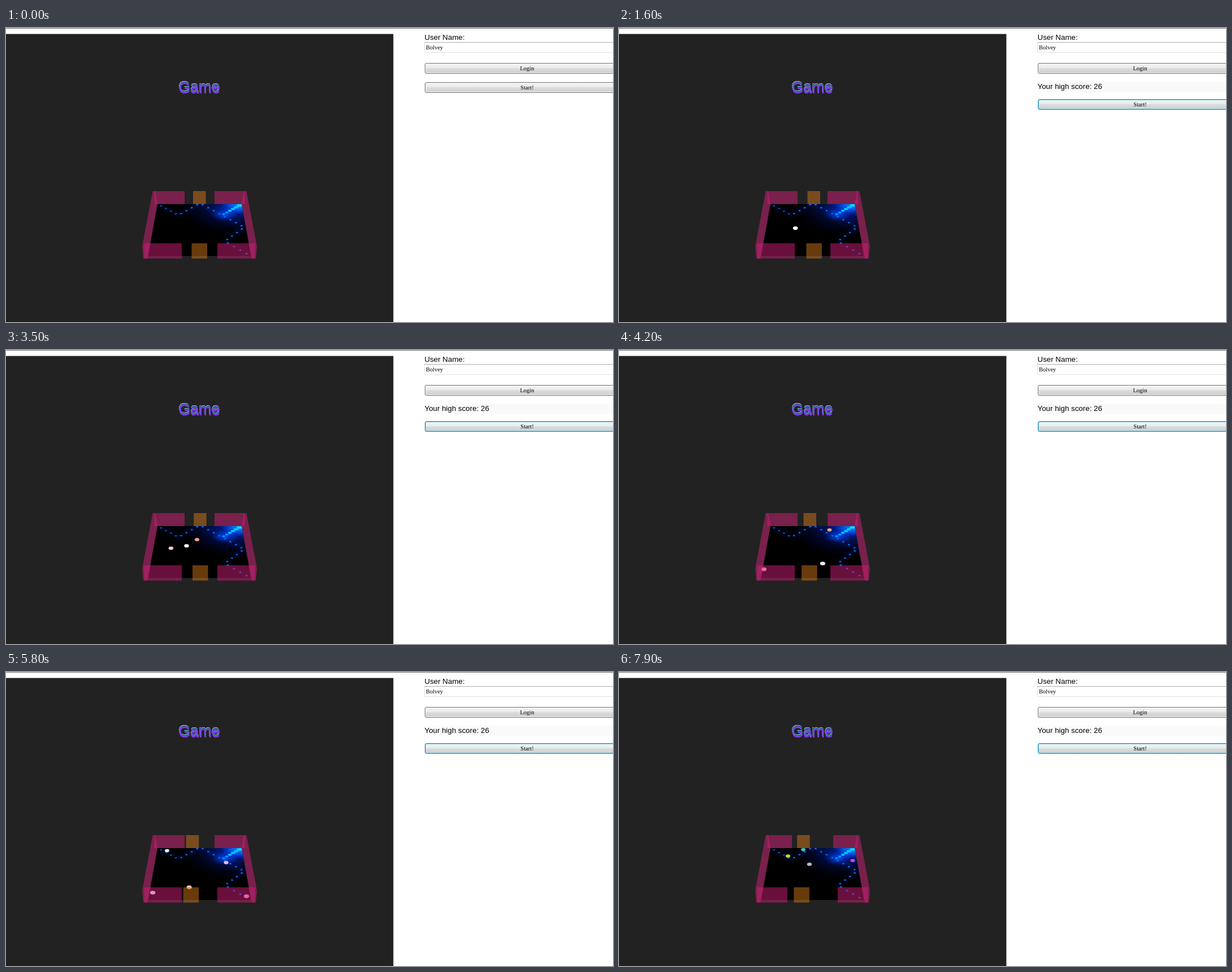
Write an HTML page with a canvas that moves like this. It is 1074 px wide and 521 px high and loops after 8 s.

```html
<!DOCTYPE html>
<html lang="en">
<head>
<meta charset="utf-8">
<style>
html, body { margin: 0; width: 100%; height: 100%; overflow: hidden; background: #fff; }
canvas { display: block; }
</style>
</head>
<body>
<canvas id="stage" width="1074" height="521"></canvas>
<script>
const c = document.getElementById('stage').getContext('2d');
const LOOP = 8000, STEP = 100, AXIS = 342.5;
const SANS = '"Liberation Sans", Arial, sans-serif';
const SERIF = '"Liberation Serif", "Times New Roman", serif';
const PINK = 'rgba(208,30,118,.5)', GOLD = 'rgba(208,118,26,.5)';

// Floor edges: y and width at the far and near end.
const FAR = { y: 312, w: 149 }, NEAR = { y: 404, w: 181 };

// Straight flights on the unit floor: from, to, u, v, end u, end v, colours.
// Ends outside 0..1 are folded back, which makes the ball bounce off the walls.
const flights = [
  [1400, 5000, .385, .611, -.887, -1.164, '#fff', '#ffa9cb'],
  [2800, 5000, .368, .074, -.195, 1.329, '#ffc4dc', '#fff'],
  [3000, 5000, .309, .45, .957, -.18, '#f2a184', '#f9b6dc'],
  [4400, 6700, .531, .261, -.148, -.099, '#dff5ee', '#28d878'],
  [5000, 7200, .887, .836, 1.296, 1.17, '#ffa9cb', '#f79cc8'],
  [5000, 6700, .195, .671, -.155, 1.589, '#fff', '#fff'],
  [5000, 6700, .957, .18, 1.478, .46, '#f9b6dc', '#e2bdf2'],
  [5600, 7900, .452, .861, -.217, .167, '#ffc9b2', '#aee048'],
  [6700, 7900, .148, .099, .465, .351, '#28d878', '#b9b9b9'],
  [6700, 7900, .155, .411, .39, .018, '#fff', '#40bfc4'],
  [6700, 7900, .522, .46, .953, .268, '#e2bdf2', '#b452e2']
];
const paddlePath = [[0, 0], [1400, 0], [2300, 11], [5000, -11], [8000, -16]];
const lightPath = [[270, 313], [305, 331.5], [343, 310.5], [421.5, 353], [387, 378], [431, 403]];

const mix = (a, b, k) => a + (b - a) * k;
const fold = p => 1 - Math.abs(1 - ((p % 2) + 2) % 2);
const hits = (u, v) => Math.abs(Math.floor(u)) + Math.abs(Math.floor(v));

function paddleShift(t) {
  const i = paddlePath.findIndex(p => p[0] > t);
  const [t1, x1] = paddlePath[i - 1], [t2, x2] = paddlePath[i];
  return mix(x1, x2, (t - t1) / (t2 - t1));
}

// Perspective: width on screen is inverse to depth.
function project(u, v) {
  const w = 1 / mix(1 / FAR.w, 1 / NEAR.w, .02 + .96 * v);
  const k = (w - FAR.w) / (NEAR.w - FAR.w);
  return [AXIS + (u - .5) * w, mix(FAR.y, NEAR.y, k), w / 160];
}

function rect(x, y, w, h, fill) {
  c.fillStyle = fill;
  c.fillRect(x, y, w, h);
}

function trace(points) {
  c.beginPath();
  points.forEach(([x, y]) => c.lineTo(x, y));
  c.closePath();
}

function poly(points, fill) {
  trace(points);
  c.fillStyle = fill;
  c.fill();
}

function oval(x, y, rx, ry, fill) {
  c.beginPath();
  c.ellipse(x, y, rx, ry, 0, 0, 7);
  c.fillStyle = fill;
  c.fill();
}

// Soft light lying flat on the floor.
function glow(x, y, r, colors) {
  const g = c.createRadialGradient(0, 0, 0, 0, 0, r);
  colors.forEach((color, i) => g.addColorStop((i / (colors.length - 1)) ** 1.4, color));
  c.save();
  c.translate(x, y);
  c.scale(1, .5);
  oval(0, 0, r, r, g);
  c.restore();
}

function text(s, x, y, font, fill = '#000', align = 'left') {
  c.font = font;
  c.fillStyle = fill;
  c.textAlign = align;
  c.fillText(s, x, y);
}

function title() {
  ['#86f5c8', '#5cd6b8', '#3a4f98', '#5a34b8', '#8043ee'].forEach((fill, i) =>
    text('Game', 341.6 + i * .15, 112.6 + i * .8, '27px ' + SANS, fill, 'center'));
}

function floor() {
  c.save();
  trace([[268, FAR.y], [417, FAR.y], [433, NEAR.y], [252, NEAR.y]]);
  c.fillStyle = '#000';
  c.fill();
  c.clip();
  glow(405, 318, 105, ['rgba(0,70,255,.9)', 'rgba(0,48,220,.7)', 'rgba(0,28,150,.5)', 'rgba(0,12,80,.3)', 'rgba(0,0,30,0)']);
  glow(415, 313, 34, ['#00e4ff', 'rgba(0,130,255,.8)', 'rgba(0,70,255,0)']);
  glow(387, 330, 24, ['rgba(0,90,255,.8)', 'rgba(0,60,255,0)']);
  c.shadowColor = '#0030ff';
  c.shadowBlur = 7;
  lightPath.slice(1).forEach(([x2, y2], row) => {
    const [x1, y1] = lightPath[row], n = Math.ceil(Math.abs(x2 - x1) / 11);
    for (let i = 0; i < n; i++) {
      const k = (i + .5) / n;
      oval(mix(x1, x2, k), mix(y1, y2, k), 1.9, 1.2, row ? '#1070ff' : '#0c50c8');
    }
  });
  for (let k = 0; k <= 1; k += .2) {
    oval(mix(385, 413, k), mix(330, 314.5, k), 2.6 + k * 2, 1.6 + k * .6, k < .3 ? '#00a0ff' : '#00dcff');
  }
  c.restore();
}

function ball(t, [from, to, u1, v1, u2, v2, first, last]) {
  if (t <= from || t > to) return;
  const k = (t - from) / (to - from), u = mix(u1, u2, k), v = mix(v1, v2, k);
  const [x, y, size] = project(fold(u), fold(v));
  // The last bounce gives the ball its new colour.
  oval(x, y, 4.2 * size, 3 * size, hits(u, v) === hits(u2, v2) ? last : first);
}

// Fills a shape and its reflection in the middle line of the board.
function mirrored(points, fill) {
  poly(points, fill);
  poly(points.map(([x, y]) => [2 * AXIS - x, y]), fill);
}

const box = (x1, y1, x2, y2) => [[x1, y1], [x2, y1], [x2, y2], [x1, y2]];

function board(t) {
  const wide = t >= 6000, shift = paddleShift(t);
  floor();
  mirrored(box(262.5, 289, wide ? 306 : 316, 312), PINK);
  rect(331 + shift, 289, 22.5, 23, GOLD);
  flights.forEach(f => ball(t, f));
  mirrored([[259.5, 289], [264, 289], [268, 312], [250, 408.5], [243, 408.5], [241, 387]], PINK);
  mirrored(box(244.5, 381.5, wide ? 298 : 311, 408.5), PINK);
  rect(328.5 + shift * 1.21, 381.5, 27.5, 27, GOLD);
}

function button(label, y, focused, hover) {
  const shade = c.createLinearGradient(0, y, 0, y + 19);
  const tones = hover ? ['#eef7fc', '#e0f1fa', '#cbe6f5', '#b8dcf0']
                      : ['#f3f3f3', '#ebebeb', '#dddddd', '#cdcdcd'];
  [0, .5, .5, 1].forEach((p, i) => shade.addColorStop(p, tones[i]));
  const outline = (inset, color) => {
    c.beginPath();
    c.roundRect(741 + inset, y + inset, 362 - 2 * inset, 19 - 2 * inset, 3 - inset);
    c.strokeStyle = color;
    c.stroke();
  };
  c.lineWidth = 1;
  rect(742, y + 1, 360, 17, shade);
  outline(1.5, focused ? '#62c8ec' : '#f6f6f6');
  outline(.5, focused || hover ? '#3c8fb5' : '#707070');
  text(label, 922, y + 13, '10.5px ' + SERIF, '#000', 'center');
}

function panel(t) {
  const scored = t >= 700;
  text('User Name:', 740.5, 21, '13.33px ' + SANS);
  c.lineWidth = 1;
  c.strokeStyle = '#e2e3ea';
  c.strokeRect(740.5, 25.5, 370, 18);
  rect(740, 25, 334, 1, '#abadb3');
  text('Bolvey', 743, 38, '10.5px ' + SERIF);
  button('Login', 62, t >= 400 && t < 1400, t >= 200 && t < 700);
  if (scored) {
    rect(740, 95, 334, 19, '#fafafa');
    text('Your high score: 26', 740.5, 108, '13.33px ' + SANS);
  }
  button('Start!', scored ? 126 : 96, t >= 1400, t >= 1100 && t < 1400);
}

function draw(now) {
  const t = Math.floor(now % LOOP / STEP) * STEP;
  rect(0, 0, 1074, 521, '#fff');
  rect(0, 0, 1074, 1, '#747474');
  rect(0, 10.6, 685.4, 511, '#222');
  title();
  board(t);
  panel(t);
}

const start = performance.now();
function frame() {
  draw(performance.now() - start);
  requestAnimationFrame(frame);
}
frame();
</script>
</body>
</html>
```
